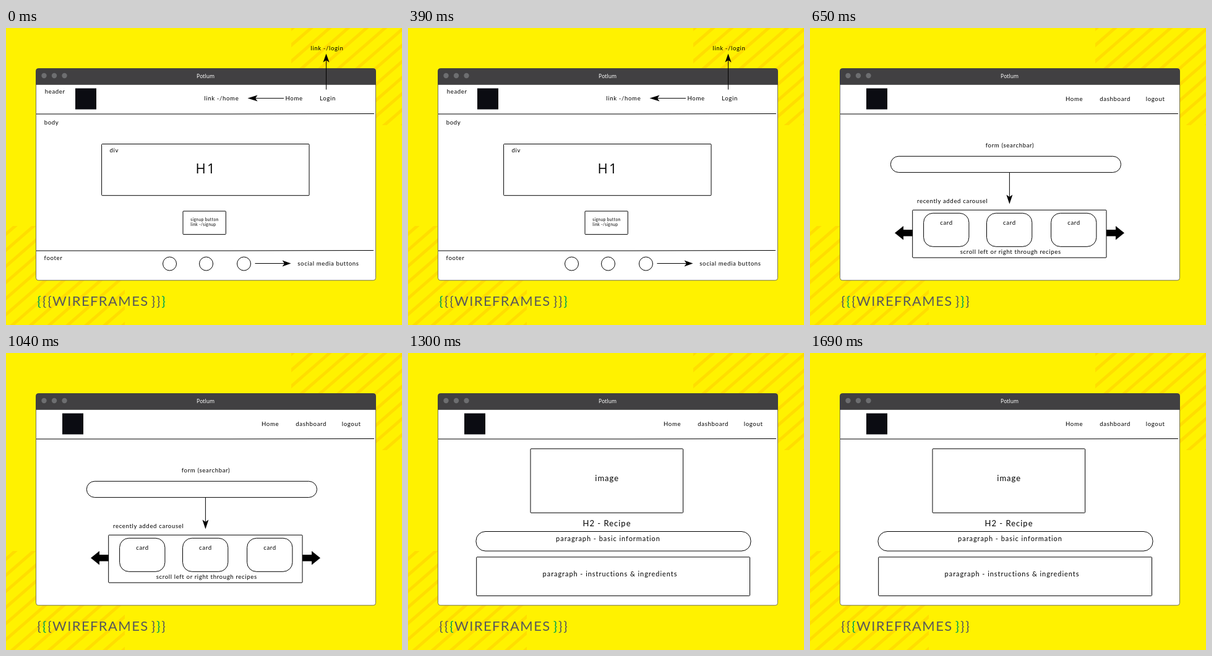
Animation of 640 by 480 pixels, one loop 1950 ms. Source, as an HTML page:

```html
<!DOCTYPE html>
<html lang="en">
<head>
<meta charset="utf-8">
<title>Wireframes</title>
<style>
html, body { margin: 0; width: 100%; height: 100%; overflow: hidden; background: #fff200; }
svg { display: block; width: 640px; height: 480px; }
text { font-family: Lato, sans-serif; font-size: 9.6px; letter-spacing: .65px; fill: #000; }
.mid { text-anchor: middle; }
.tiny { font-size: 6.6px; letter-spacing: .4px; }
.big { font: 22px "Open Sans", sans-serif; letter-spacing: 2.2px; }
.sub { font-size: 13px; letter-spacing: 1px; }
.para { font-size: 11px; letter-spacing: .95px; }
.bar { font: 8.6px "Noto Sans", sans-serif; letter-spacing: 0; fill: #fff; }
.word { font-size: 22px; letter-spacing: 1.4px; fill: #58595b; }
.brace { font-size: 22px; letter-spacing: 0; }
.line { fill: none; stroke: #000; stroke-width: 1; }
</style>
</head>
<body>
<svg viewBox="0 0 640 480" xmlns="http://www.w3.org/2000/svg">
  <clipPath id="topRight"><rect x="461" width="179" height="157"/></clipPath>
  <clipPath id="lowLeft"><rect y="320" width="192" height="160"/></clipPath>
  <rect width="640" height="480" fill="#fff200"/>
  <g id="stripes" stroke="#ffde00" stroke-width="5"></g>
  <rect x="48.5" y="65.5" width="549" height="342.3" rx="4" fill="#fff" stroke="#55544a" stroke-width=".8"/>
  <path d="M48.5 91.5V69.5a4 4 0 0 1 4-4H593.5a4 4 0 0 1 4 4V91.5Z" fill="#414042" stroke="#333" stroke-width=".6"/>
  <g fill="#6d6e70">
    <circle cx="61.5" cy="77" r="4.2"/><circle cx="78" cy="77" r="4.2"/><circle cx="94.5" cy="77" r="4.2"/>
  </g>
  <text class="bar mid" x="322.5" y="81">Potlum</text>
  <path class="line" d="M49 139H363L595 138.5"/>
  <rect id="logo" y="97.5" width="34" height="34" fill="#0b0c12"/>
  <g id="scenes"></g>
  <text class="word" x="75" y="449">WIREFRAMES</text>
  <g id="braces"></g>
</svg>
<script>
const HOLD = 650;
const $ = id => document.getElementById(id);

const text = (x, y, s, cls = "") => `<text x="${x}" y="${y}" class="${cls}">${s}</text>`;
const mid = (x, y, s, cls = "") => text(x, y, s, "mid " + cls);
const box = (x1, y1, x2, y2, r = 1) =>
  `<rect class="line" x="${x1}" y="${y1}" width="${x2 - x1}" height="${y2 - y1}" rx="${r}"/>`;
const ring = (x, y) => `<circle class="line" cx="${x}" cy="${y}" r="11"/>`;

// Thin arrow with a notched head, drawn along +x and turned into place
function arrow(x, y, len, angle, head = 14) {
  const back = len - head;
  return `<g transform="translate(${x} ${y}) rotate(${angle})">
    <path class="line" d="M0 0H${back + 4}"/>
    <path d="M${len} 0L${back} -5L${back + 3.5} 0L${back} 5Z"/></g>`;
}

const blockArrow = (x, dir) =>
  `<path transform="translate(${x} 331.3) scale(${dir} 1)" d="M0 -5.3H15V-11.3L29 0L15 11.3V5.3H0Z"/>`;

const nav = text(413, 118, "Home") + text(468.3, 118, "dashboard") + text(542.8, 118, "logout");
const card = x => box(x, 299.3, x + 73.3, 353.3, 15) + mid(x + 36.9, 318, "card");

const landing = [
  text(62.7, 106, "header"), text(61.7, 155.5, "body"),
  text(320.3, 117, "link -/home"), text(451.5, 117, "Home"), text(507, 117, "Login"),
  text(492.3, 36, "link -/login"),
  arrow(449, 113.6, 58.5, 180, 16), arrow(517.5, 99.5, 58, -90),
  box(154.6, 187.5, 490, 270.7), text(167.6, 201, "div"), text(306.5, 235, "H1", "big"),
  box(286, 296, 355.3, 333.6),
  text(298.3, 312, "signup button", "tiny"), text(298.3, 320, "link -/signup", "tiny"),
  '<path class="line" d="M49 360H363L594 359.5"/>',
  text(61.6, 375, "footer"),
  ring(264.5, 381), ring(323.5, 381), ring(384.5, 381),
  arrow(402.5, 380.5, 58, 0), text(471.3, 383.5, "social media buttons")
];

const dashboard = [
  nav,
  mid(323, 193, "form (searchbar)"),
  box(130.3, 207.3, 502.5, 233.4, 13),
  arrow(322.4, 233.5, 51, 90, 15),
  text(173, 283, "recently added carousel"),
  box(165.7, 294.2, 479, 371.2),
  card(183.6), card(285.5), card(389.6),
  mid(324.3, 365, "scroll left or right through recipes"),
  blockArrow(166, -1), blockArrow(479, 1)
];

const recipe = [
  nav,
  box(198, 154.8, 444.6, 258.3), mid(321.7, 207, "image", "sub"),
  mid(321.5, 280, "H2 - Recipe", "sub"),
  box(110, 288.5, 554, 320, 15), mid(323.5, 304, "paragraph - basic information", "para"),
  box(110.7, 329.8, 552.5, 392.4), mid(326.5, 361, "paragraph - instructions &amp; ingredients", "para")
];

$("scenes").innerHTML = [landing, dashboard, recipe].map(s => `<g>${s.join("")}</g>`).join("");

// Diagonal lines inside a clipped corner
function stripes(clip, first, count) {
  let d = "";
  for (let i = 0; i < count; i++) {
    const y = first + i * 26;
    d += `M-20 ${y + 17.4}L660 ${y - 574.2}`;
  }
  return `<path clip-path="url(#${clip})" d="${d}"/>`;
}
$("stripes").innerHTML = stripes("topRight", 403, 13) + stripes("lowLeft", 333, 13);

// Pairs run from the outermost to the innermost
$("braces").innerHTML = [[53.5, 254.5], [62, 246.2], [70.5, 238]].map(([l, r]) =>
  `<g>${mid(l, 449, "{", "brace")}${mid(r, 449, "}", "brace")}</g>`).join("");

const scenes = [...$("scenes").children];
const pairs = [...$("braces").children];

function draw(t) {
  const now = Math.floor(t / HOLD) % 3;
  scenes.forEach((g, i) => g.setAttribute("visibility", i === now ? "visible" : "hidden"));
  pairs.forEach((g, i) => {
    for (const c of g.children) c.style.fill = i === now ? "#00a651" : "#58595b";
  });
  $("logo").setAttribute("x", now ? 91 : 112);
}

let start = null;
function tick(t) {
  if (start === null) start = t;
  draw(t - start);
  requestAnimationFrame(tick);
}
draw(0);
requestAnimationFrame(tick);
</script>
</body>
</html>
```
